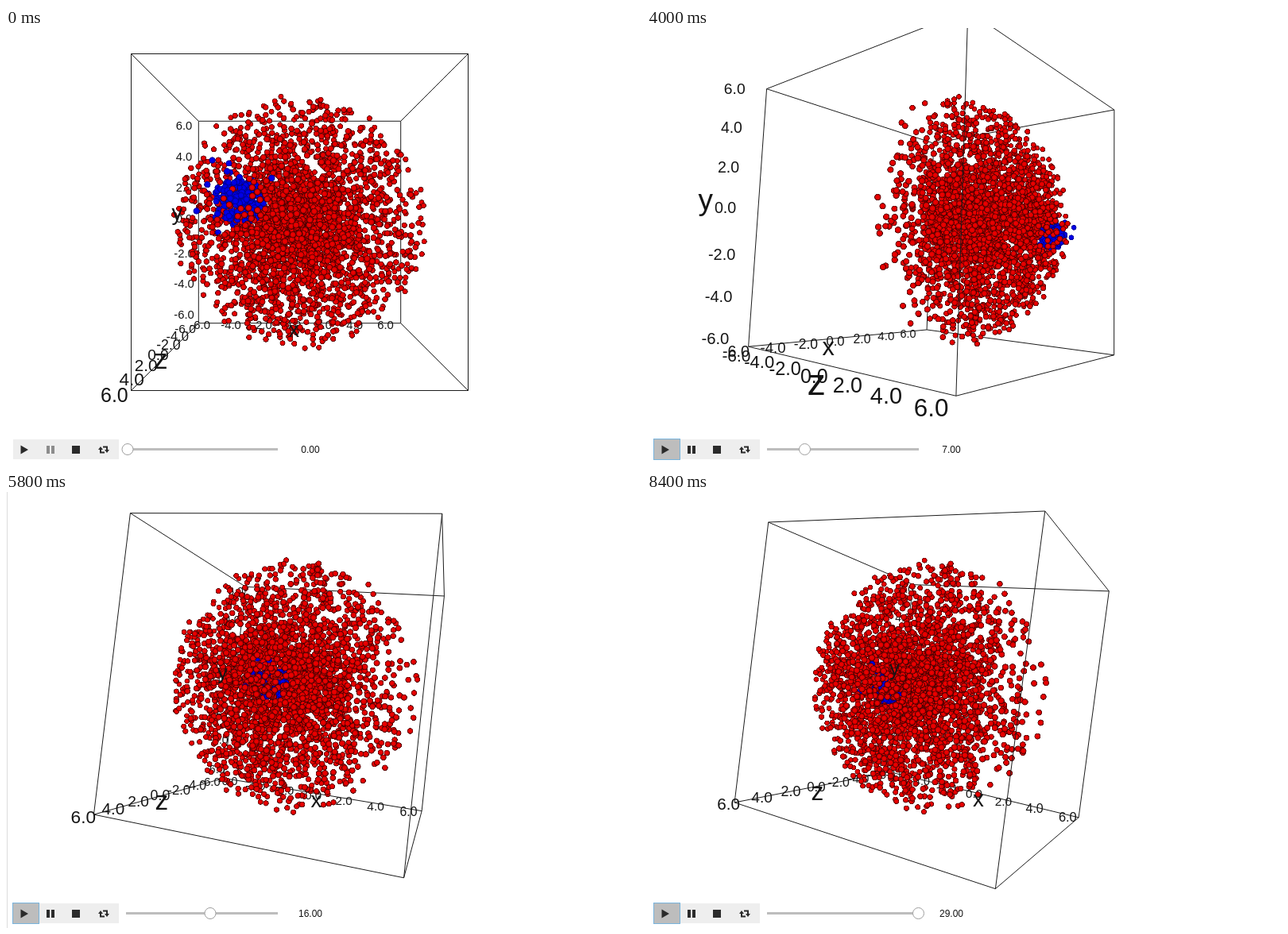
Recreate the animation shown at these times as an HTML page with a canvas. Size 799x549 px, loop 8500 ms.

```html
<!DOCTYPE html>
<html>
<head>
<meta charset="utf-8">
<style>
html, body { margin: 0; width: 100%; height: 100%; overflow: hidden; background: #fff; }
canvas { display: block; }
</style>
</head>
<body>
<canvas id="stage" width="799" height="549"></canvas>
<script>
const ctx = document.getElementById('stage').getContext('2d');
const LOOP = 8500, STEP = 100, PLAY_START = 2500;
const CENTER_X = 369.5, CENTER_Y = 244.5, FOCAL = 636, DISTANCE = 4;
const FONT = '"Liberation Sans", Arial, sans-serif';
const INK = '#2b2b2b';

const clamp01 = v => Math.min(1, Math.max(0, v));
const ramp = (t, from, to) => clamp01((t - from) / (to - from));
const easeOut = k => 1 - (1 - k) ** 2;

// The user's drags: first turn, long sweep back, slow drift, quick swing, settling.
function cameraAngles(t) {
  const turn = ramp(t, 300, 1100);
  const sweep = ramp(t, 3350, 5100);
  const drift = ramp(t, 5100, 6600);
  const swing = ramp(t, 6600, 7000);
  const settle = easeOut(ramp(t, 7000, 8400));
  return {
    yaw: 80.2 * turn - 83.2 * sweep - 29 * drift - 25 * swing + 29.4 * settle,
    pitch: -3.4 * turn + 1.6 * sweep - 3.1 * Math.sin(Math.PI * sweep)
      + 0.7 * drift + 5 * swing - 2.8 * settle,
    roll: 0.2 * turn - 5.9 * sweep - 1.4 * drift - 0.2 * settle
  };
}

// Waypoints of the blue cluster within the sequence.
const WAYPOINTS = [
  { at: 0, pos: [-.40, .14, .67] },
  { at: 2, pos: [.25, -.12, .90] },
  { at: 7, pos: [.56, -.10, .72] },
  { at: 13, pos: [.06, .01, .50] },
  { at: 20, pos: [-.10, -.04, .70] },
  { at: 29, pos: [-.10, -.05, .60] }
];

function clusterCenter(value) {
  const next = Math.max(1, WAYPOINTS.findIndex(w => w.at >= value));
  const a = WAYPOINTS[next - 1], b = WAYPOINTS[next];
  const k = ramp(value, a.at, b.at);
  return a.pos.map((p, i) => p + (b.pos[i] - p) * k);
}

let seed = 20177;
function random() {
  seed = (seed + 0x6D2B79F5) | 0;
  let n = Math.imul(seed ^ (seed >>> 15), 1 | seed);
  n = (n + Math.imul(n ^ (n >>> 7), 61 | n)) ^ n;
  return ((n ^ (n >>> 14)) >>> 0) / 4294967296;
}

function polar(theta, length) {
  const angle = random() * Math.PI * 2, side = Math.sin(theta) * length;
  return [side * Math.cos(angle), side * Math.sin(angle), Math.cos(theta) * length];
}

// Red fills a spherical sector around z, denser near its axis and its tip.
const redPoints = Array.from({ length: 3300 },
  () => polar(1.32 * random() ** .7, .98 * random() ** .6));
// Blue is a ball with a few stragglers.
const bluePoints = Array.from({ length: 270 }, (_, i) =>
  polar(Math.acos(2 * random() - 1), Math.cbrt(random()) * (i % 16 ? 1 : 2.2)));

function ballSprite(light, base, edge) {
  const sprite = document.createElement('canvas');
  sprite.width = sprite.height = 32;
  const g = sprite.getContext('2d');
  const fill = g.createRadialGradient(15, 15, 1, 16, 16, 16);
  fill.addColorStop(0, light);
  fill.addColorStop(.6, base);
  fill.addColorStop(1, edge);
  g.fillStyle = fill;
  g.arc(16, 16, 15.5, 0, Math.PI * 2);
  g.fill();
  return sprite;
}
const redBall = ballSprite('#f40000', '#d80000', '#200000');
const blueBall = ballSprite('#0000f0', '#0000dc', '#000078');

// Where tick texts and the title sit for each axis.
const AXES = [
  { name: 'x', ticks: [-.07, -1.06, -1.15], title: [-.06, -1.13, -1.26] },
  { name: 'y', ticks: [-1.18, .03, -1.16], title: [-1.28, .08, -1.28] },
  { name: 'z', ticks: [-1.12, -1.055, 0], title: [-1.1, -1.1, 0] }
];
const tickLabels = [];
AXES.forEach((axis, n) => {
  for (let v = -6; v <= 6; v += 2) {
    const pos = axis.ticks.slice();
    pos[n] += v / 6.35;
    if (axis.name === 'y' && v < 0) pos[n] -= .04;
    tickLabels.push({ pos, text: v.toFixed(1) });
  }
});

// Two corners joined by an edge differ in exactly one bit.
const corner = n => [0, 1, 2].map(bit => (n >> bit & 1) * 2 - 1);
const edges = [];
for (let n = 0; n < 8; n++) {
  for (const bit of [1, 2, 4]) if (!(n & bit)) edges.push([corner(n), corner(n | bit)]);
}

function rotate(u, v, degrees) {
  const a = degrees * Math.PI / 180, c = Math.cos(a), s = Math.sin(a);
  return [u * c - v * s, u * s + v * c];
}

function makeProjector({ yaw, pitch, roll }) {
  return ([x, y, z]) => {
    let depth;
    [z, x] = rotate(z, x, yaw);
    [y, depth] = rotate(y, z, pitch);
    [x, y] = rotate(x, y, roll);
    const scale = FOCAL / (DISTANCE - depth);
    return { x: CENTER_X + x * scale, y: CENTER_Y - y * scale, depth, scale };
  };
}

function drawText(value, x, y, size) {
  ctx.font = `${size}px ${FONT}`;
  ctx.fillStyle = '#151515';
  ctx.textAlign = 'center';
  ctx.textBaseline = 'middle';
  ctx.fillText(value, x, y);
}

function drawEdges(list) {
  ctx.strokeStyle = '#1c1c1c';
  ctx.lineWidth = 1;
  ctx.beginPath();
  list.forEach(([a, b]) => {
    ctx.moveTo(a.x, a.y);
    ctx.lineTo(b.x, b.y);
  });
  ctx.stroke();
}

function drawBall(sprite, p) {
  const r = .0212 * p.scale;
  ctx.drawImage(sprite, p.x - r, p.y - r, r * 2, r * 2);
}

function drawScene(t) {
  const project = makeProjector(cameraAngles(t));
  const value = Math.max(0, (t - PLAY_START) / 200);
  const center = clusterCenter(Math.min(29, value));
  const radius = .1 + .065 * Math.exp(-value);
  const lines = edges.map(e => e.map(project));
  const isFront = ([a, b]) => a.depth + b.depth > 0;

  const items = [
    ...redPoints.map(p => ({ ...project(p), sprite: redBall })),
    ...bluePoints.map(p => ({
      ...project(p.map((o, i) => center[i] + o * radius)), sprite: blueBall
    })),
    ...tickLabels.map(l => ({ ...project(l.pos), text: l.text }))
  ].sort((a, b) => a.depth - b.depth);

  drawEdges(lines.filter(l => !isFront(l)));
  items.forEach(item => {
    if (item.sprite) drawBall(item.sprite, item);
    else drawText(item.text, item.x, item.y, .12 * item.scale);
  });
  drawEdges(lines.filter(isFront));
  AXES.forEach(axis => {
    const p = project(axis.title);
    drawText(axis.name, p.x, p.y, .225 * p.scale);
  });
}

function rect(color, x, y, w, h) {
  ctx.fillStyle = color;
  ctx.fillRect(x, y, w, h);
}

function triangle(...points) {
  ctx.fillStyle = INK;
  ctx.beginPath();
  points.forEach(([x, y]) => ctx.lineTo(x, y));
  ctx.fill();
}

function drawRepeatHalf() {
  rect(INK, -5, -2, 2, 6);
  rect(INK, -5, 2.5, 6, 2);
  triangle([-7, 0], [-4, -4], [-1, 0]);
}

function drawControls(t) {
  const playing = t >= PLAY_START;
  const value = Math.max(0, Math.floor((t - PLAY_START) / 200));

  rect('#eeeeee', 9, 518, 133, 25);
  if (playing) {
    rect('#bdbdbd', 8, 517, 33, 26);
    ctx.strokeStyle = '#79b4dc';
    ctx.lineWidth = 1;
    ctx.strokeRect(8.5, 517.5, 33, 26);
  } else if (t >= 2100) {
    rect('#cfcfcf', 9, 543, 33, 2);
  }
  triangle([18.5, 525.5], [28, 531], [18.5, 536.5]);
  for (const x of [51, 57]) rect(playing ? INK : '#8c8c8c', x, 526, 4, 10);
  rect(INK, 83, 526, 10, 10);

  for (const turn of [0, Math.PI]) {
    ctx.save();
    ctx.translate(123, 531);
    ctx.rotate(turn);
    drawRepeatHalf();
    ctx.restore();
  }

  rect('#bdbdbd', 151, 529, 191, 3);
  ctx.beginPath();
  ctx.arc(153 + 6.5 * value, 530.5, 7, 0, Math.PI * 2);
  ctx.fillStyle = '#fff';
  ctx.fill();
  ctx.strokeStyle = '#9e9e9e';
  ctx.lineWidth = 1;
  ctx.stroke();
  drawText(value.toFixed(2), 383, 531.5, 12);
}

const start = performance.now();
let shown = -1;
function frame() {
  const elapsed = (performance.now() - start) % LOOP;
  const t = Math.floor(elapsed / STEP) * STEP;
  if (t !== shown) {
    shown = t;
    rect('#fff', 0, 0, 799, 549);
    drawScene(t);
    if (t >= 4700 && t < 6300) rect('#dcdcdc', 1, 0, 1, 549);
    drawControls(t);
  }
  requestAnimationFrame(frame);
}
frame();
</script>
</body>
</html>
```
